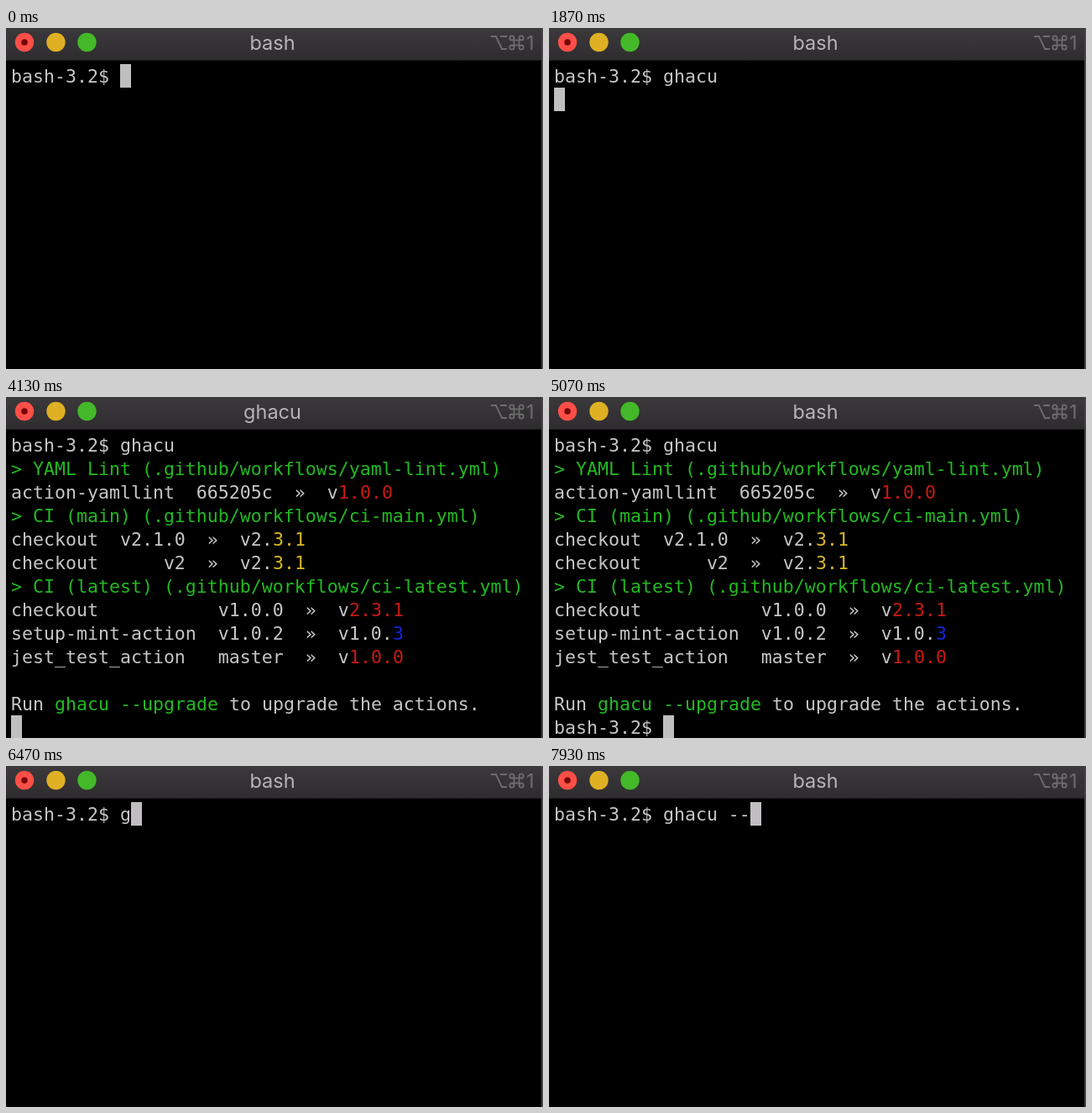
Recreate the animation shown at these times as an HTML page with a canvas. Size 640 px wide and 406 px high, loop 8000 ms.

```html
<!DOCTYPE html>
<html lang="en">
<head>
<meta charset="utf-8">
<title>Terminal</title>
<style>
html, body { margin: 0; width: 100%; height: 100%; overflow: hidden; background: #000; }
canvas { display: block; }
</style>
</head>
<body>
<canvas id="stage" width="640" height="406"></canvas>
<script>
const ctx = document.getElementById('stage').getContext('2d');
const LOOP = 8000;
const CELL = 13, ROW = 28, LEFT = 6, TOP = 43;
const MONO = '21.59px "DejaVu Sans Mono", monospace';
const UI = '23.5px Inter, sans-serif';
const GREY = '#c6c6c6', GREEN = '#22b922', RED = '#c81a12', YELLOW = '#d8b728', BLUE = '#1524dc';
const PROMPT = 'bash-3.2$ ';

// Each row is a list of [text, colour] runs.
const OUTPUT = [
  [['> YAML Lint (.github/workflows/yaml-lint.yml)', GREEN]],
  [['action-yamllint  665205c  »  v'], ['1.0.0', RED]],
  [['> CI (main) (.github/workflows/ci-main.yml)', GREEN]],
  [['checkout  v2.1.0  »  v2.'], ['3.1', YELLOW]],
  [['checkout      v2  »  v2.'], ['3.1', YELLOW]],
  [['> CI (latest) (.github/workflows/ci-latest.yml)', GREEN]],
  [['checkout           v1.0.0  »  v'], ['2.3.1', RED]],
  [['setup-mint-action  v1.0.2  »  v1.0.'], ['3', BLUE]],
  [['jest_test_action   master  »  v'], ['1.0.0', RED]],
  [],
  [['Run '], ['ghacu --upgrade', GREEN], [' to upgrade the actions.']]
];

// Key press times, one per character.
const FIRST = [930, 1070, 1270, 1330, 1400];
const CLEAR = [5200, 5270, 5400, 5530, 5600];
const SECOND = [6470, 6600, 6800, 6870, 7000, 7600, 7800, 7930];
const ENTER = 1870, TITLE_ON = 2200, PRINT = 4130, DONE = 4200, WIPE = 5730;

const typed = (text, keys, t) => text.slice(0, keys.filter(k => k <= t).length);

function screenAt(t) {
  if (t >= WIPE) return [[[PROMPT + typed('ghacu --', SECOND, t)]]];
  const rows = [[[PROMPT + typed('ghacu', FIRST, t)]]];
  if (t >= PRINT) rows.push(...OUTPUT);
  if (t >= ENTER) rows.push([[t >= DONE ? PROMPT + typed('clear', CLEAR, t) : '']]);
  return rows;
}

function drawText(text, x, y, font, color, align = 'left') {
  ctx.font = font;
  ctx.fillStyle = color;
  ctx.textAlign = align;
  ctx.fillText(text, x, y);
}

function dot(x, y, r, color) {
  ctx.fillStyle = color;
  ctx.beginPath();
  ctx.arc(x, y, r, 0, Math.PI * 2);
  ctx.fill();
}

function drawShortcut() {
  const color = '#6d6c6d';
  ctx.strokeStyle = color;
  ctx.lineWidth = 1.8;
  ctx.beginPath();
  ctx.moveTo(578, 10);
  ctx.lineTo(584, 10);
  ctx.lineTo(591, 25);
  ctx.lineTo(597, 25);
  ctx.moveTo(589, 10);
  ctx.lineTo(597, 10);
  ctx.stroke();

  const cx = 608.5, cy = 17.5, half = 3, r = 2.6;
  ctx.strokeRect(cx - half, cy - half, half * 2, half * 2);
  for (const sx of [-1, 1]) for (const sy of [-1, 1]) {
    ctx.beginPath();
    ctx.arc(cx + sx * (half + r), cy + sy * (half + r), r, 0, Math.PI * 2);
    ctx.stroke();
  }
  drawText('1', 620, 26, UI, color);
}

function drawBar(title) {
  const shade = ctx.createLinearGradient(0, 0, 0, 38);
  shade.addColorStop(0, '#3b393b');
  shade.addColorStop(1, '#2e2c2e');
  ctx.fillStyle = shade;
  ctx.fillRect(0, 0, 640, 38);
  ctx.fillStyle = '#1c1b1c';
  ctx.fillRect(0, 38, 640, 1);
  dot(22, 17, 11.2, '#fd4f48');
  dot(22, 17, 3.8, '#780506');
  dot(59.5, 17, 11.2, '#dfb023');
  dot(96.5, 17, 11.2, '#43b929');
  drawText(title, 317.5, 26, UI, '#b6b5b6', 'center');
  drawShortcut();
}

function drawRow(runs, row) {
  let col = 0;
  for (const [text, color = GREY] of runs) {
    drawText(text, LEFT + col * CELL, TOP + row * ROW + 22, MONO, color);
    col += text.length;
  }
  return col;
}

function draw(t) {
  ctx.fillStyle = '#000';
  ctx.fillRect(0, 0, 640, 406);
  drawBar(t >= TITLE_ON && t < DONE ? 'ghacu' : 'bash');

  const rows = screenAt(t);
  let col = 0;
  rows.forEach((runs, i) => { col = drawRow(runs, i); });
  ctx.fillStyle = '#c1bec1';
  ctx.fillRect(LEFT + col * CELL, TOP + (rows.length - 1) * ROW, CELL, ROW);

  ctx.fillStyle = '#454445';
  ctx.fillRect(638, 0, 2, 406);
}

let start;
function tick(now) {
  start ??= now;
  draw((now - start) % LOOP);
  requestAnimationFrame(tick);
}
draw(0);
requestAnimationFrame(tick);
</script>
</body>
</html>
```
